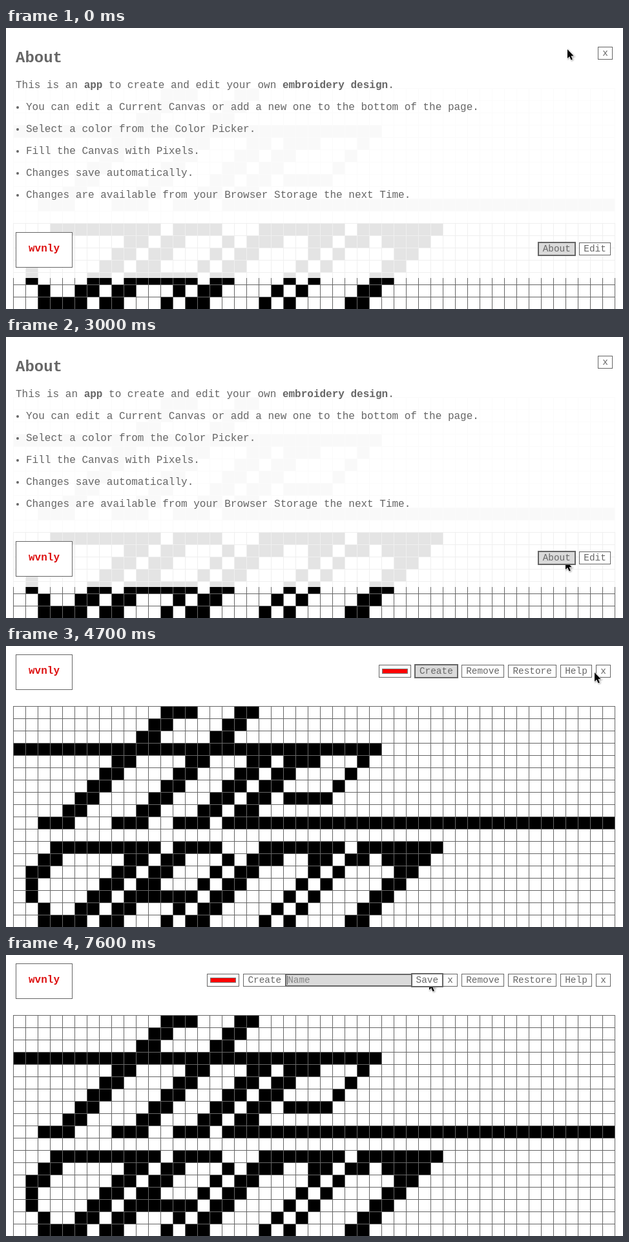
Write an HTML page with a canvas that moves like this. It is 955 px wide and 435 px high and loops after 8 s.

```html
<!DOCTYPE html>
<html lang="en">
<head>
<meta charset="utf-8">
<title>Embroidery editor</title>
<style>
html, body { margin: 0; width: 100%; height: 100%; overflow: hidden; background: #fff; }
body { position: relative; font: 16px/20px "Liberation Mono", monospace; color: #666; }
[hidden] { display: none !important; }
#grid, #veil, #about, #head, #cursor { position: absolute; left: 0; top: 0; }
#veil, #about { width: 955px; background: rgba(255,255,255,.893); }
#veil { height: 387px; }
#about { height: 302px; background: rgba(255,255,255,.78); }
#about > * { position: absolute; left: 15px; margin: 0; white-space: pre; }
h1 { top: 33px; font: bold 24px/27px "Liberation Mono", monospace; }
#about p { top: 79px; }
#about ul { top: 113px; padding: 0; list-style: none; }
li { position: relative; padding-left: 16px; margin-bottom: 14px; }
li::before { content: ""; position: absolute; left: 1px; top: 8px; width: 4px; height: 4px; border-radius: 50%; background: #666; }
#about .btn { left: auto; right: 16px; top: 29px; }
#head { width: 955px; height: 84px; }
#logo { position: absolute; left: 15px; top: 13px; width: 86px; height: 38px; padding-top: 15px; border: 1px solid #666;
  background: #fff; color: #d11; font-weight: bold; text-align: center; }
.bar { position: absolute; right: 19.2px; top: 29px; display: flex; gap: 6.4px; }
.group { display: flex; }
.btn { position: relative; box-sizing: border-box; height: 20px; padding: 0 6px; border: 1px solid #666; background: #fff;
  font-size: 14.4px; line-height: 18px; white-space: pre; }
.focus { background: #dadada; }
.down { background: #d0d0d0; }
.hover, .focus { box-shadow: 0 0 0 1px #666; z-index: 1; }
.color { width: 50px; padding: 5px 4px; }
.color::before { content: ""; display: block; height: 6px; border: 1px solid #777; background: #f00; }
.field { width: 194.4px; height: 18px; margin-top: 1px; padding: 0 2px; line-height: 16px; color: #858585; }
.field::before { content: ""; position: absolute; left: 1px; top: 1px; width: 1px; height: 14px; background: #555; }
#cursor { overflow: visible; filter: drop-shadow(1px 1px 1px rgba(0,0,0,.35)); }
</style>
</head>
<body>
<canvas id="grid" width="955" height="435"></canvas>
<div id="veil"></div>
<div id="about">
  <h1>About</h1>
  <p>This is an <b>app</b> to create and edit your own <b>embroidery design</b>.</p>
  <ul><li>You can edit a Current Canvas or add a new one to the bottom of the page.</li><li>Select a color from the Color Picker.</li><li>Fill the Canvas with Pixels.</li><li>Changes save automatically.</li><li>Changes are available from your Browser Storage the next Time.</li></ul>
  <div class="btn">x</div>
</div>
<div id="head">
  <div id="logo">wvnly</div>
  <div class="bar" id="menu"><div class="btn" id="info">About</div><div class="btn" id="edit">Edit</div></div>
  <div class="bar" id="tools">
    <div class="btn color"></div>
    <div class="group">
      <div class="btn" id="create">Create</div>
      <div class="group" id="form"><div class="btn field focus">Name</div><div class="btn">Save</div><div class="btn">x</div></div>
    </div>
    <div class="btn">Remove</div><div class="btn">Restore</div><div class="btn">Help</div><div class="btn">x</div>
  </div>
</div>
<svg id="cursor" width="14" height="20"><path d="M1 1V15L4.2 12 6.6 17.4 8.9 16.4 6.6 11.2H10.8Z" stroke="#fff" stroke-width="1.4" paint-order="stroke"/></svg>
<script>
const $ = id => document.getElementById(id);
const LOOP = 8000, CELL = 19, LEFT = 11, TOP = 93, COLS = 49;
const g = $('grid').getContext('2d');

const fill = (row, col, w, h = 1) => g.fillRect(LEFT + col * CELL, TOP + row * CELL, w * CELL, h * CELL);

// Strokes leaning one cell left per row, one for each starting column
function slant(row, rows, w, ...cols) {
  for (const col of cols) for (let i = 0; i < rows; i++) fill(row + i, col - i, w);
}

// Horizontal strokes of equal width
const dash = (row, w, ...cols) => cols.forEach(col => fill(row, col, w));

function drawUpperLine() {
  slant(0, 10, 2, 12, 18);
  slant(4, 6, 2, 19, 22);
  slant(4, 4, 1, 28);
  dash(0, 3, 12);
  dash(3, 30, 0);
  dash(4, 3, 22);
  dash(7, 4, 22);
  dash(9, 3, 2, 8, 13);
  dash(9, 32, 17);
}

function drawLowerLine() {
  slant(12, 6, 2, 9, 12, 19, 32);
  slant(12, 6, 1, 17, 25, 27);
  slant(12, 2, 2, 2);
  dash(11, 9, 3);
  dash(11, 4, 13);
  dash(11, 7, 20, 28);
  dash(12, 2, 20, 24, 27, 30);
  dash(12, 4, 30);
  fill(14, 1, 1, 2);
  dash(15, 6, 9);
  dash(16, 1, 2);
  dash(17, 4, 2);
}

function drawGrid() {
  drawUpperLine();
  drawLowerLine();
  g.fillStyle = '#666';
  for (let c = 0; c <= COLS; c++) g.fillRect(LEFT + c * CELL, TOP, 1, 435);
  for (let y = TOP; y < 435; y += CELL) g.fillRect(LEFT, y, COLS * CELL + 1, 1);
}

// Pointer trips: arrival time, steps of 100 ms, place, optional bend
const trips = [
  { at: 700, steps: 1, to: [870, 51] },
  { at: 1200, steps: 4, to: [892, 334] },
  { at: 1400, steps: 1, to: [892, 373] },
  { at: 2100, steps: 2, to: [891, 364] },
  { at: 2600, steps: 4, to: [865, 345] },
  { at: 3100, steps: 1, to: [856, 319] },
  { at: 3600, steps: 5, to: [908, 7] },
  { at: 3900, steps: 2, to: [909, 16] },
  { at: 4300, steps: 3, to: [910, 40] },
  { at: 6200, steps: 9, to: [582, 100], bend: [455, 250] },
  { at: 7200, steps: 9, to: [654, 39] }
];

function pointer(t) {
  let pos = [868, 32];
  for (const { at, steps, to, bend } of trips) {
    const p = Math.min(1, 1 - (at - t) / (steps * 100));
    if (p <= 0) break;
    pos = pos.map((a, i) => {
      const mid = bend ? bend[i] : (a + to[i]) / 2;
      return a * (1 - p) ** 2 + 2 * mid * p * (1 - p) + to[i] * p * p;
    });
  }
  return pos.map(Math.round);
}

const buttons = [...document.querySelectorAll('.btn')];

function render(now) {
  const t = Math.floor(now % LOOP / 100) * 100;
  const about = t < 3100, tools = t >= 4700, form = t >= 7600;
  $('about').hidden = $('veil').hidden = !about;
  $('head').style.top = (about ? 303 : 0) + 'px';
  $('menu').hidden = tools;
  $('tools').hidden = !tools;
  $('form').hidden = !form;
  $('info').classList.toggle('focus', t < 4600);
  $('edit').classList.toggle('focus', t >= 4600);
  $('create').classList.toggle('focus', !form);
  $('create').classList.toggle('down', t >= 7300 && !form);

  const [x, y] = pointer(t);
  $('cursor').style.transform = `translate(${x}px,${y}px)`;
  for (const b of buttons) {
    const r = b.getBoundingClientRect();
    b.classList.toggle('hover', x + 1 >= r.left && x + 1 < r.right && y + 1 >= r.top && y + 1 < r.bottom);
  }
}

drawGrid();
const start = performance.now();
function frame() {
  render(performance.now() - start);
  requestAnimationFrame(frame);
}
frame();
</script>
</body>
</html>
```
